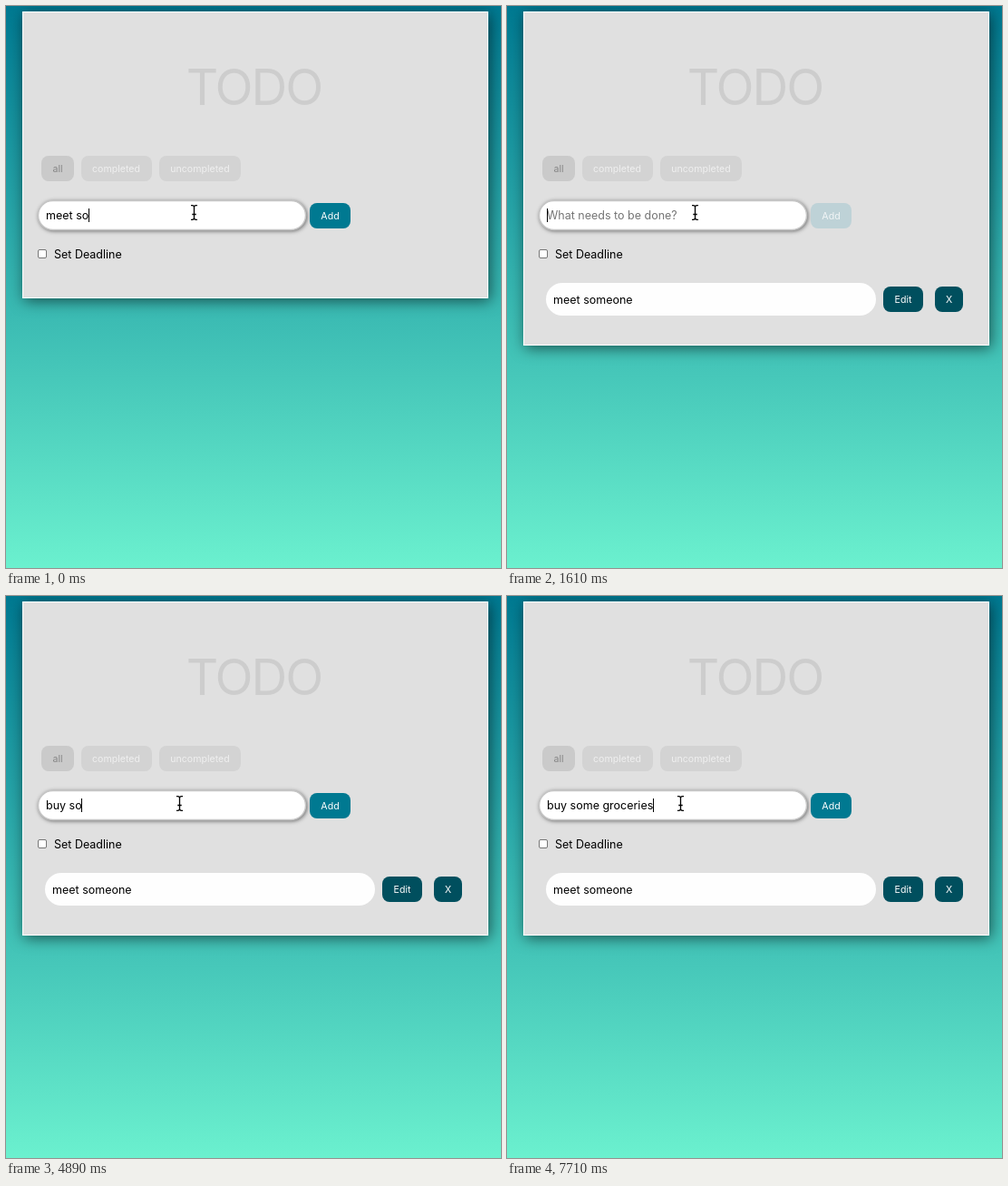
Recreate the animation shown at these times as an HTML page. Size 546 by 619 pixels, loop 8 s.

```html
<!DOCTYPE html>
<html lang="en">
<head>
<meta charset="utf-8">
<title>Todo</title>
<style>
  html, body { margin: 0; width: 100%; height: 100%; overflow: hidden; }
  body { background: linear-gradient(#007991, #78ffd6) 0 0 / 100% 694px no-repeat; }
  svg { display: block; width: 546px; height: 619px; }
  text { font: 12.5px Inter, "Liberation Sans", sans-serif; font-optical-sizing: none; white-space: pre; }
  .title { font-size: 55px; letter-spacing: -2px; fill: #cdcdcd; }
  .card { fill: #e0e0e0; stroke: #fff; filter: drop-shadow(2px 3px 8px rgba(0, 0, 0, .55)); }
  .field { fill: #fff; stroke: #c6c6c6; stroke-width: 1.5; filter: drop-shadow(1px 1px 2px rgba(0, 0, 0, .5)); }
  .button text { font-size: 10.6px; text-anchor: middle; fill: #fff; }
  .filter rect { fill: #d3d3d3; }
  .filter text { fill: #efefef; }
  .filter.on rect { fill: #cacaca; }
  .filter.on text { fill: #868686; }
  .dark rect { fill: #004f5e; }
  .add rect { fill: #007991; }
  .add.off rect { fill: #bed2d7; }
  .add.off text { fill: #f1f5f6; }
  .hint { fill: #757575; }
  .check { fill: #fff; stroke: #767676; }
  .beam path { fill: none; stroke: #000; stroke-width: 1.3; }
  .beam .halo { stroke: #fff; stroke-width: 3; opacity: .8; }
</style>
</head>
<body>
<svg viewBox="0 0 546 619">
  <rect id="card" class="card" x="18.5" y="6.5" width="513" height="315"/>
  <text class="title" x="273.5" y="109" text-anchor="middle">TODO</text>

  <g class="button filter on"><rect x="39" y="165" width="36" height="28" rx="8"/><text x="57" y="183">all</text></g>
  <g class="button filter"><rect x="83" y="165" width="78" height="28" rx="8"/><text x="121.5" y="183">completed</text></g>
  <g class="button filter"><rect x="169" y="165" width="90" height="28" rx="8"/><text x="214" y="183">uncompleted</text></g>

  <rect class="field" x="35.5" y="214.5" width="295" height="32" rx="16"/>
  <text id="hint" class="hint" x="44" y="235">What needs to be done?</text>
  <text id="entry" x="44" y="235"></text>
  <rect id="caret" x="44" y="223" width="1" height="15"/>
  <g id="add" class="button add"><rect x="335" y="217" width="45" height="28" rx="8"/><text x="357.5" y="235">Add</text></g>

  <rect class="check" x="35.5" y="268.5" width="9" height="9" rx="1.5"/>
  <text x="53" y="278">Set Deadline</text>

  <g id="item">
    <rect x="43" y="305" width="364" height="36" rx="18" fill="#fefefe"/>
    <text x="51" y="328">meet someone</text>
    <g class="button dark"><rect x="415" y="309" width="44" height="28" rx="8"/><text x="437" y="327">Edit</text></g>
    <g class="button dark"><rect x="472" y="309" width="31" height="28" rx="8"/><text x="487.5" y="327">X</text></g>
  </g>

  <g id="beam" class="beam">
    <path class="halo" d="M204 219.7h1.5q2 0 2 2q0-2 2-2h1.5M207.5 221v13M204 235.3h1.5q2 0 2-2q0 2 2 2h1.5M205.3 229.5h4.4"/>
    <path d="M204 219.7h1.5q2 0 2 2q0-2 2-2h1.5M207.5 221v13M204 235.3h1.5q2 0 2-2q0 2 2 2h1.5M205.3 229.5h4.4"/>
  </g>
</svg>
<script>
  const LOOP = 8000;
  const $ = id => document.getElementById(id);

  // Each edit: start time, characters to delete, text to append.
  const edits = [
    [0, 0, 'meet so'], [120, 0, 'm'], [240, 0, 'e'], [300, 0, 'o'], [480, 0, 'n'], [600, 0, 'e'],
    [1140, 12, ''],
    [4300, 0, 'b'], [4420, 0, 'u'], [4480, 0, 'y'], [4590, 0, ' '],
    [4770, 0, 's'], [4890, 0, 'o'], [5070, 0, 'm'], [5190, 0, 'e'], [5310, 0, ' '],
    [5430, 0, 'go'], [5550, 0, 'r'], [5730, 0, 'e'], [5910, 0, 'c'],
    [6150, 1, ''], [6270, 1, ''], [6450, 1, ''], [6630, 1, ''],
    [6690, 0, 'r'], [6810, 0, 'o'], [7110, 0, 'c'],
    [7350, 0, 'e'], [7470, 0, 'r'], [7530, 0, 'i'], [7590, 0, 'e'], [7710, 0, 's']
  ];
  const caretOff = [[1080, 1550], [2090, 2570], [3040, 3580], [4060, 4300]];
  const beamPath = [[2570, 0, 0], [2640, -2, 0], [2860, -16, 1], [3040, -22, 1], [3100, -21, 1], [3220, -16, 1]];

  function typed(t) {
    let text = '';
    for (const [at, cut, add] of edits) {
      if (at > t) break;
      text = text.slice(0, text.length - cut) + add;
    }
    return text;
  }

  function beamAt(t) {
    const s = 3100 + Math.floor((t - 3100) / 60) * 60;
    const i = beamPath.findIndex(p => p[0] > s);
    if (i === 0) return [0, 0];
    if (i < 0) return beamPath[beamPath.length - 1].slice(1);
    const a = beamPath[i - 1], b = beamPath[i];
    const k = (s - a[0]) / (b[0] - a[0]);
    return [1, 2].map(j => Math.round(a[j] + (b[j] - a[j]) * k));
  }

  const show = (el, on) => { el.style.visibility = on ? 'visible' : 'hidden'; };

  function draw(now) {
    const t = now % LOOP;
    const text = typed(t);
    const added = t >= 1610;
    $('entry').textContent = text;
    show($('hint'), !text);
    $('add').classList.toggle('off', !text);

    const width = text ? $('entry').getComputedTextLength() : 0;
    $('caret').setAttribute('x', 44 + Math.floor(width));
    show($('caret'), !caretOff.some(([from, to]) => t >= from && t < to));

    show($('item'), added);
    $('card').setAttribute('height', added ? 367 : 315);
    $('beam').setAttribute('transform', `translate(${beamAt(t)})`);
  }

  const start = performance.now();
  function tick() {
    draw(performance.now() - start);
    requestAnimationFrame(tick);
  }
  tick();
</script>
</body>
</html>
```
